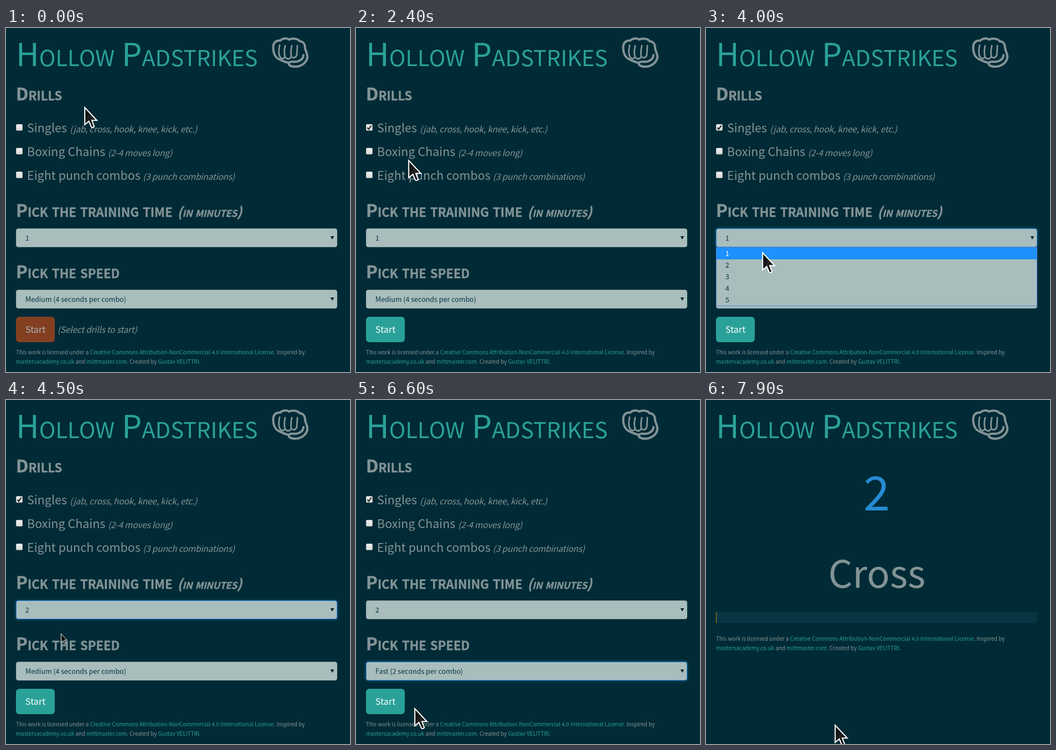
These frames come from a looping animation (621 by 623 pixels, 8000 ms). An HTML page:

```html
<!DOCTYPE html>
<html lang="en">
<head>
<meta charset="utf-8">
<title>Hollow Padstrikes</title>
<style>
  html, body { margin: 0; width: 100%; height: 100%; overflow: hidden; background: #002b36; }
  svg { display: block; width: 621px; height: 623px; }
  text { font-family: "Noto Sans CJK JP", "Noto Sans CJK SC", "Noto Sans CJK", sans-serif; fill: #839496; white-space: pre; }
  .title { font-size: 57.3px; font-variant: small-caps; fill: #2aa198; }
  .head, .head-note { font-weight: 700; font-variant: small-caps; stroke: #839496; stroke-width: .35; }
  .head { font-size: 31.5px; }
  .head-note { font-size: 24.1px; font-style: italic; letter-spacing: -.25px; }
  .label { font-size: 21.5px; }
  .note { font-size: 15.5px; font-style: italic; letter-spacing: -.24px; }
  .field { font-size: 12.53px; fill: #073642; }
  .start { font-size: 16.1px; fill: #fff; }
  .foot { font-size: 9.85px; }
  .foot tspan { fill: #2aa198; }
  .count { font-size: 86px; fill: #268bd2; text-anchor: middle; }
  .move { font-size: 68.6px; text-anchor: middle; }
  .select rect { fill: #a9bdbd; stroke: #93a9aa; }
  .select path { fill: #06262e; }
  .focus rect { stroke: #2f86d6; filter: drop-shadow(0 0 2.5px rgba(38, 139, 210, .6)); }
  .popup .panel { fill: #a9bdbd; stroke: #4f86dc; }
  .popup .bar { fill: #1e90ff; }
  .popup .on { fill: #fff; }
  .fist { fill: none; stroke: #839496; stroke-width: 4; stroke-linecap: round; stroke-linejoin: round; }
  .fist .fingers { stroke-width: 2.8; }
  .off { opacity: .65; }
</style>
</head>
<body>
<svg viewBox="0 0 621 623" xmlns="http://www.w3.org/2000/svg">
  <defs>
    <linearGradient id="ink" x2="1" y2="1">
      <stop offset="0"/><stop offset=".5" stop-color="#222"/><stop offset="1"/>
    </linearGradient>
    <linearGradient id="box" x2="0" y2="1">
      <stop offset="0" stop-color="#f2f2f2"/><stop offset="1" stop-color="#d8d8d8"/>
    </linearGradient>
  </defs>

  <text class="title" x="18" y="69">Hollow Padstrikes</text>
  <g class="fist">
    <path d="M511 63C503 62 498 59 492 56C484 52 481 40 483 30C485 24 491 22 495 23C499 18 508 18 511 21C517 18 527 19 530 24C537 24 540 30 540 37C541 42 545 48 544 54C542 63 533 70 522 70C514 70 509 67 511 63C514 59 522 63 528 60C533 58 537 54 537 49"/>
    <path class="fingers" d="M494 31C492 40 492 48 495 53Q500 58 503 53M504 32C502 40 502 47 504 53Q510 59 514 53M516 32C514 40 514 46 515 52Q521 57 525 49L526 32"/>
  </g>

  <g id="setup">
    <text class="head" x="18" y="131">Drills</text>
    <g id="drills"></g>
    <path id="tick" d="M20.5 180.5L23 183.2L27.6 176.6" fill="none" stroke="#2c2c2c" stroke-width="2.2"/>

    <text class="head" x="18" y="342">Pick the training time</text>
    <text class="head-note" x="309.5" y="342">(in minutes)</text>
    <g id="time" class="select">
      <rect x="18.5" y="363.5" width="579" height="33" rx="3.5"/>
      <path d="M585.6 377h6.8l-3.4 6z"/>
      <text class="field" x="35" y="385"></text>
    </g>

    <text class="head" x="18" y="453">Pick the speed</text>
    <g id="speed" class="select">
      <rect x="18.5" y="474.5" width="579" height="33" rx="3.5"/>
      <path d="M585.6 488h6.8l-3.4 6z"/>
      <text class="field" x="35" y="496"></text>
    </g>

    <g id="button">
      <rect x="18" y="523" width="70" height="46" rx="6"/>
      <text class="start" x="35" y="552">Start</text>
    </g>
    <text id="hint" class="note" x="93" y="552">(Select drills to start)</text>
  </g>

  <g id="run">
    <text class="count" x="308" y="200">2</text>
    <text class="move" x="308.4" y="340">Cross</text>
    <rect x="18" y="384" width="580" height="20" rx="4" fill="#073642"/>
    <rect id="progress" x="18" y="384" width="1" height="20" fill="#b58900"/>
  </g>

  <g id="footer">
    <text class="foot" x="18" y="591">This work is licensed under a <tspan>Creative Commons Attribution-NonCommercial 4.0 International License</tspan>. Inspired by</text>
    <text class="foot" x="18" y="608"><tspan>mastersacademy.co.uk</tspan> and <tspan>mittmaster.com</tspan>. Created by <tspan>Gustav VELITTRI</tspan>.</text>
  </g>

  <g id="popups"></g>

  <g id="cursor">
    <path id="large" d="M1.2 2V33.2L8.6 27L13 37.2Q15 39.2 18.3 36.4L14 25.3H23Z" fill="url(#ink)" stroke="#fff" stroke-width="2"/>
    <path id="small" d="M.5 .5V16L4 12.8L6.5 18.5L8.9 17.4L6.4 11.8H11Z" stroke="#fff"/>
  </g>
</svg>

<script>
const LOOP = 8000, STEP = 100;
const $ = id => document.getElementById(id);
const show = (el, on) => { el.style.display = on ? '' : 'none'; };

const minutes = ['1', '2', '3', '4', '5'];
const speeds = ['Slow (8', 'Medium (4', 'Fast (2'].map(s => s + ' seconds per combo)');

$('drills').innerHTML = [
  ['Singles', 115, '(jab, cross, hook, knee, kick, etc.)'],
  ['Boxing Chains', 184, '(2-4 moves long)'],
  ['Eight punch combos', 247, '(3 punch combinations)']
].map(([name, x, note], i) => {
  const y = 189 + 43 * i;
  return `<rect x="18.5" y="${y - 14.5}" width="11" height="11" rx="1.5" fill="url(#box)" stroke="#b4bcbc"/>
    <text class="label" x="38" y="${y}">${name}</text><text class="note" x="${x}" y="${y}">${note}</text>`;
}).join('');

// Option list below a select; returns a function that highlights one row.
function makePopup(options, top, row) {
  const g = document.createElementNS('http://www.w3.org/2000/svg', 'g');
  g.setAttribute('class', 'popup');
  g.innerHTML = `<rect class="panel" x="18.5" y="${top + .5}" width="579" height="${options.length * row + 1}"/>
    <rect class="bar" x="19" width="578" height="${row}"/>` +
    options.map((s, i) => `<text class="field" x="35" y="${top + 1 + i * row + row / 2 + 4.5}">${s}</text>`).join('');
  $('popups').append(g);
  const bar = g.querySelector('.bar'), rows = g.querySelectorAll('text');
  return (open, y, initial) => {
    show(g, open);
    const hit = Math.floor((y - top - 1) / row);
    const active = hit < 0 ? initial : Math.min(hit, options.length - 1);
    bar.setAttribute('y', top + 1 + active * row);
    rows.forEach((r, i) => r.classList.toggle('on', i === active));
  };
}
const timePopup = makePopup(minutes, 397, 21);
const speedPopup = makePopup(speeds, 508, 19);

// Pointer path: time, x, y
const path = [
  [0, 141, 142], [100, 141, 142], [200, 181, 107], [400, 181, 107], [600, 161, 153],
  [700, 161, 153], [1200, 64, 185], [1800, 64, 185], [2000, 71, 187], [2100, 71, 187],
  [2400, 94, 238], [2700, 95, 300], [3000, 86, 346], [3100, 88, 374], [3200, 88, 374],
  [3500, 103, 386], [3700, 103, 386], [4300, 99, 423], [4600, 99, 423], [4900, 102, 473],
  [5000, 102, 473], [5100, 95, 493], [5500, 95, 493], [5700, 106, 524], [6100, 105, 568],
  [6200, 105, 568], [6300, 105, 557], [6600, 105, 557], [7000, 85, 555], [7500, 85, 555],
  [7600, 119, 555], [7700, 119, 555], [7900, 232, 587]
];

function pointer(t) {
  const i = path.findIndex(p => p[0] >= t);
  if (i <= 0) return path[0].slice(1);
  const [t0, x0, y0] = path[i - 1], [t1, x1, y1] = path[i];
  const k = (t - t0) / (t1 - t0);
  return [Math.round(x0 + (x1 - x0) * k), Math.round(y0 + (y1 - y0) * k)];
}

function setSelect(id, value, focused) {
  $(id).querySelector('text').textContent = value;
  $(id).classList.toggle('focus', focused);
}

function draw(t) {
  const within = (a, b) => t >= a && t < b;
  const [x, y] = pointer(t);
  const ready = t >= 1500, running = t >= 7300, small = within(4500, 4700);

  show($('setup'), !running);
  show($('run'), running);
  show($('progress'), t >= 7800);
  $('footer').setAttribute('transform', `translate(0 ${running ? -155 : 0})`);

  show($('tick'), ready);
  show($('hint'), !ready);
  $('button').classList.toggle('off', !ready);
  $('button').setAttribute('fill', !ready ? '#cb4b16' : t >= 7200 ? '#20796f' : '#2aa198');

  setSelect('time', minutes[t < 4500 ? 0 : 1], within(3700, 5300));
  setSelect('speed', speeds[t < 6600 ? 1 : 2], within(5300, 7300));
  timePopup(within(3700, 4500), y, 0);
  speedPopup(within(5300, 6600), y, 1);

  $('cursor').setAttribute('transform', `translate(${x} ${y})`);
  show($('large'), !small);
  show($('small'), small);
}

const begin = performance.now();
function tick() {
  const t = (performance.now() - begin) % LOOP;
  draw(Math.floor(t / STEP) * STEP);
  requestAnimationFrame(tick);
}
tick();
</script>
</body>
</html>
```
